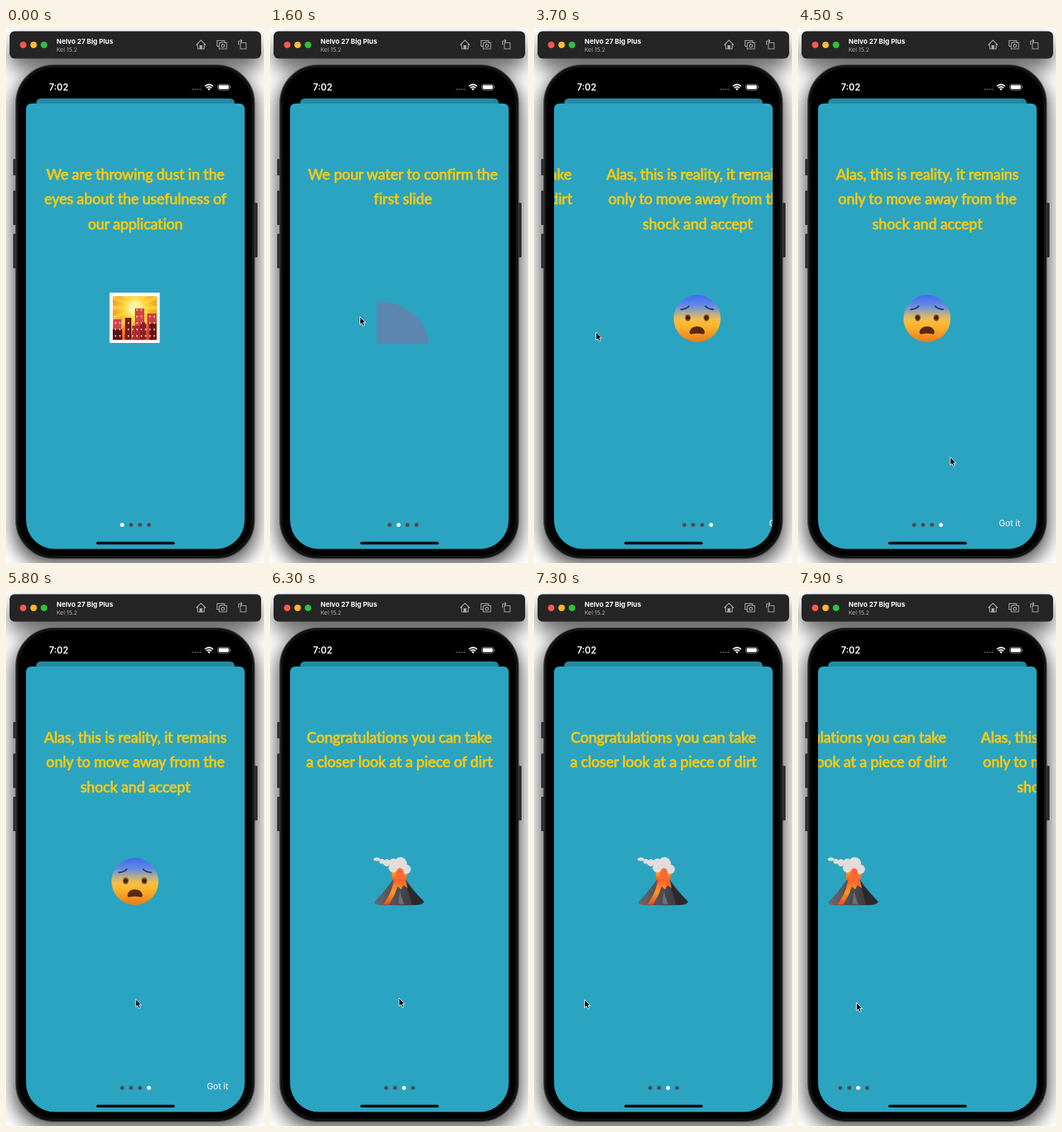
An HTML page that plays this animation: 360 px wide and 744 px high, repeating every 8 s.

```html
<!DOCTYPE html>
<html lang="en">
<head>
<meta charset="utf-8">
<title>Onboarding slides</title>
<style>
  html, body { margin: 0; width: 100%; height: 100%; overflow: hidden; background: #fff; }
  svg { display: block; width: 360px; height: 744px; }
  text { font-family: Inter, Roboto, sans-serif; fill: #fff; }
  .title {
    font: 500 20.6px Lato, "Open Sans", sans-serif; letter-spacing: -.15px; text-anchor: middle;
    fill: #f5c814; stroke: #f5c814; stroke-width: .75px; stroke-linejoin: round;
  }
</style>
</head>
<body>
<svg viewBox="0 0 360 744" xmlns="http://www.w3.org/2000/svg">
  <defs>
    <filter id="blur" x="-30%" y="-100%" width="160%" height="300%"><feGaussianBlur stdDeviation="13"/></filter>
    <clipPath id="sheetClip"><use href="#sheet"/></clipPath>
    <clipPath id="photoClip"><rect x="149" y="373" width="61.500" height="60.500"/></clipPath>
    <radialGradient id="sky" gradientUnits="userSpaceOnUse" cx="180" cy="389" r="46">
      <stop offset=".12" stop-color="#fff6b0"/><stop offset=".35" stop-color="#ffd22e"/>
      <stop offset=".7" stop-color="#fb9a1c"/><stop offset="1" stop-color="#ee4f1a"/>
    </radialGradient>
    <linearGradient id="skin" x2="0" y2="1">
      <stop offset="0" stop-color="#3f6cf0"/><stop offset=".22" stop-color="#628ae2"/>
      <stop offset=".4" stop-color="#b5ae90"/><stop offset=".52" stop-color="#f2bd4a"/>
      <stop offset=".66" stop-color="#ffb62c"/><stop offset="1" stop-color="#e87a18"/>
    </linearGradient>
    <linearGradient id="lava" x2="0" y2="1">
      <stop offset="0" stop-color="#ff5a2a"/><stop offset=".5" stop-color="#ff9a24"/><stop offset="1" stop-color="#ee4f18"/>
    </linearGradient>
    <linearGradient id="rock">
      <stop offset="0" stop-color="#6a6a70"/><stop offset=".5" stop-color="#4a4a50"/><stop offset="1" stop-color="#2e2e34"/>
    </linearGradient>
    <pattern id="windows" width="6" height="9" patternUnits="userSpaceOnUse" x="1" y="3">
      <rect x="1" y="1" width="1.600" height="2.400" fill="#ffe08a"/>
    </pattern>
  </defs>

  <!-- Backdrop shadows -->
  <rect width="360" height="744" fill="#fff"/>
  <g filter="url(#blur)">
    <rect x="10" y="62" width="340" height="685" rx="50" opacity=".7"/>
    <rect x="5" y="18" width="351" height="38" rx="7" opacity=".6"/>
  </g>

  <!-- Window bar -->
  <rect x="5" y="4.500" width="351" height="38" rx="7" fill="#262526"/>
  <circle cx="24" cy="23.500" r="4.600" fill="#fe5950"/>
  <circle cx="38.500" cy="23.500" r="4.600" fill="#fdba2c"/>
  <circle cx="53" cy="23.500" r="4.600" fill="#2ac43e"/>
  <text x="70.500" y="22" font-size="9.400" font-weight="700">Nelvo 27 Big Plus</text>
  <text x="70.500" y="32.500" font-size="8" style="fill:#aaa">Kel 15.2</text>
  <g fill="none" stroke="#a9a9a9" stroke-width="1.100" stroke-linejoin="round" stroke-linecap="round">
    <path d="M265.500 23.500L272 17L278.500 23.500M267.500 22.500V29H276.500V22.500"/>
    <rect x="270.500" y="24.500" width="3" height="4.500" fill="#a9a9a9"/>
    <path d="M297 25.500H294.500V17.500H305V19.500"/>
    <path d="M297.500 20.500H300L301 19.500H304.500L305.500 20.500H308V29H297.500Z"/>
    <circle cx="302.700" cy="24.700" r="2.100"/>
    <path d="M327 20.500H335V29H327ZM324.500 23V18H329M327.500 16.200L329.300 18L327.500 19.800"/>
  </g>

  <!-- Phone -->
  <g fill="#2c2c2e">
    <rect x="10" y="182" width="5" height="23" rx="1.500"/>
    <rect x="10" y="226" width="5" height="48" rx="1.500"/>
    <rect x="10" y="286" width="5" height="48" rx="1.500"/>
    <rect x="346" y="243" width="5" height="76" rx="1.500"/>
  </g>
  <rect x="14" y="51.500" width="332.500" height="686" rx="53" fill="#000" stroke="#39393b" stroke-width="1.600"/>
  <rect x="16.500" y="54" width="327.500" height="681" rx="51" fill="none" stroke="#161617" stroke-width="2"/>
  <text x="60" y="87" font-size="12.600" font-weight="600">7:02</text>
  <g fill="#4c4c4e">
    <circle cx="260.500" cy="85.300" r="1.200"/><circle cx="264" cy="85.300" r="1.200"/>
    <circle cx="267.500" cy="85.300" r="1.200"/><circle cx="271" cy="85.300" r="1.200"/>
  </g>
  <g fill="none" stroke="#fff" stroke-width="1.800">
    <path d="M277.700 81Q283.300 76 288.900 81M279.800 83.300Q283.300 80.200 286.800 83.300"/>
    <path d="M281.300 84.600Q283.300 82.900 285.300 84.600L283.300 86.900Z" fill="#fff" stroke="none"/>
    <rect x="295.500" y="78.300" width="16.500" height="8" rx="2.500" stroke="#888" stroke-width=".9"/>
    <rect x="296.800" y="79.600" width="13.900" height="5.400" rx="1.400" fill="#fff" stroke="none"/>
    <path d="M313.200 81V83.600" stroke="#888" stroke-width="1"/>
  </g>

  <!-- Sheets -->
  <path d="M42 120V105Q42 98 49 98H312Q319 98 319 105V120Z" fill="#2588a3"/>
  <path id="sheet" d="M28 113Q28 105 36 105H325Q333 105 333 113V684.500A40 40 0 0 1 293 724.500H68A40 40 0 0 1 28 684.500Z" fill="#2aa4c1"/>
  <g clip-path="url(#sheetClip)">
    <g id="slides">
      <g>
        <rect x="144.500" y="368" width="70" height="70" fill="#fff"/>
        <g clip-path="url(#photoClip)">
          <rect x="149" y="373" width="62" height="61" fill="url(#sky)"/>
          <path id="rays" fill="#ffe36a" opacity=".5"/>
          <circle cx="180" cy="389" r="9" fill="#fff3a0"/>
          <g id="city"></g>
        </g>
      </g>
      <path d="M144 439V380A72 59 0 0 1 216 439Z" fill="#5d87b0"/>
      <g>
        <path d="M171 405Q168 389 174 380H191Q193 392 189 405Z" fill="url(#lava)"/>
        <g fill="#e3dcdc">
          <circle cx="182" cy="379" r="9"/><circle cx="190" cy="387" r="6.500"/><circle cx="172" cy="385" r="6.500"/>
          <circle cx="172" cy="378" r="6"/><circle cx="163" cy="378" r="5"/>
          <circle cx="156" cy="376" r="3.500"/><ellipse cx="149" cy="373" rx="4.500" ry="2.500"/>
        </g>
        <path d="M177 388Q182 382 186 389L188 404H174Z" fill="#ff6a34"/>
        <path d="M145 433Q159 419 171 402Q180 406 190 402Q201 418 215 432Q214 437 200 437H156Q146 437 145 433Z" fill="url(#rock)"/>
        <path d="M189 404L198 436H206L214 432Q201 418 189 404Z" fill="#29292e"/>
        <path d="M173 401Q181 404 189 401L192 413L186 409L183 415L178 411L174 422L166 436H158Q166 425 170 414Z" fill="url(#lava)"/>
        <path d="M181 417L179 435L187 436Z" fill="#6e6e74"/>
      </g>
      <g>
        <circle cx="180" cy="404" r="32.800" fill="url(#skin)"/>
        <path d="M157.500 391.500Q164 391 168.500 387M202.500 391.500Q196 391 191.500 387" fill="none" stroke="#27386e" stroke-width="2.200" stroke-linecap="round"/>
        <g fill="#8a5518"><ellipse cx="167" cy="403" rx="4" ry="4.800"/><ellipse cx="193" cy="403" rx="4" ry="4.800"/></g>
        <g fill="#3c1c0c"><circle cx="167" cy="403" r="2.700"/><circle cx="193" cy="403" r="2.700"/></g>
        <path d="M169.500 423Q171 415 180 415Q189 415 190.500 423Q190.500 426.500 187 425.500Q180 424 173 425.500Q169.500 426.500 169.500 423Z" fill="#5a2a10"/>
        <text x="280.300" y="692.500" font-size="11.800">Got it</text>
      </g>
    </g>
  </g>
  <rect x="126" y="714.600" width="109.500" height="3.600" rx="1.800" fill="#07090a"/>

  <path id="cursor" d="M0 0V11.200L2.600 8.900L4.500 13L6.500 12.100L4.700 8.100H8Z" stroke="#fff" stroke-width=".9" stroke-linejoin="round"/>
</svg>

<script>
const LOOP = 8000, STEP = 100, PAGE = 305, SWIPE = 400;
const $ = id => document.getElementById(id);
const add = (parent, tag, attrs = {}, text = '') => {
  const el = document.createElementNS('http://www.w3.org/2000/svg', tag);
  for (const key in attrs) el.setAttribute(key, attrs[key]);
  el.textContent = text;
  return parent.appendChild(el);
};

const titles = [
  ['We are throwing dust in the', 'eyes about the usefulness of', 'our application'],
  ['We pour water to confirm the', 'first slide'],
  ['Congratulations you can take', 'a closer look at a piece of dirt'],
  ['Alas, this is reality, it remains', 'only to move away from the', 'shock and accept']
];

// Buildings: left, top, width, colour
const buildings = [
  [180, 390, 13, '#d2434c'], [197, 397, 13, '#c93d45'], [150, 405, 11, '#cf4650'],
  [166, 403, 9, '#751626'], [176, 414, 11, '#a92b36'], [187, 409, 9, '#8c1d2c'],
  [200, 411, 10, '#651322'], [149, 419, 13, '#5a1020']
];
for (const [x, y, width, colour] of buildings) {
  for (const fill of [colour, 'url(#windows)']) add($('city'), 'rect', { x, y, width, height: 434 - y, fill });
}

const spoke = angle => `${180 + 50 * Math.cos(angle)} ${389 + 50 * Math.sin(angle)}`;
$('rays').setAttribute('d', Array.from({ length: 14 }, (_, i) => {
  const angle = i * Math.PI / 7;
  return `M180 389L${spoke(angle - .09)}L${spoke(angle + .09)}Z`;
}).join(''));

[...$('slides').children].forEach((art, page) => {
  const group = add($('slides'), 'g', { transform: `translate(${page * PAGE})` });
  group.append(art);
  titles[page].forEach((line, i) =>
    add(group, 'text', { x: 180.5, y: 211 + i * 34.4, class: 'title' }, line));
  for (let i = 0; i < 4; i++) {
    add(group, 'circle', { cx: 162 + i * 12.5, cy: 691, r: 2.8, fill: i === page ? '#fff' : '#4b4d50' });
  }
});

// Swipes: start time, direction
const swipes = [[1230, 1], [2290, 1], [3400, 1], [5880, -1], [6320, -1], [6758, 1], [7744, 1]];
// Pointer stops: time, x, y
const stops = [
  [600, 332, 560], [900, 277, 403], [1200, 277, 403], [1600, 125.5, 401.5], [1700, 118, 402],
  [2000, 277, 406], [2100, 266, 407], [2250, 266, 407], [2700, 39.5, 403.5], [2800, 38, 404],
  [3300, 290, 418], [3700, 86.5, 423], [3900, 62, 425], [4900, 294, 690], [5300, 300, 696],
  [5800, 181, 567.5], [5950, 60, 566], [6250, 300, 566], [6350, 60, 566], [6700, 337, 562],
  [6900, 258, 563], [7150, 45, 568], [7700, 185, 570], [7900, 81.5, 572.5]
];

const ease = u => {
  u = Math.min(1, Math.max(0, u));
  return u * u * (3 - 2 * u);
};

function pointerAt(t) {
  const next = stops.findIndex(stop => stop[0] >= t);
  const b = stops[Math.max(next, 0)], a = stops[Math.max(next - 1, 0)];
  const u = ease((t - a[0]) / (b[0] - a[0] || 1));
  return [a[1] + (b[1] - a[1]) * u, a[2] + (b[2] - a[2]) * u];
}

function draw(t) {
  const scroll = PAGE * swipes.reduce((sum, [start, dir]) => sum + dir * ease((t - start) / SWIPE), 0);
  $('slides').setAttribute('transform', `translate(${-scroll})`);
  $('cursor').setAttribute('visibility', t < stops[0][0] ? 'hidden' : 'visible');
  $('cursor').setAttribute('transform', `translate(${pointerAt(t)})`);
}

// The picture advances ten times a second; the small lead absorbs timer jitter.
let origin;
function tick(now) {
  origin ??= now;
  draw(Math.floor((now - origin + 25) / STEP) * STEP % LOOP);
  requestAnimationFrame(tick);
}
draw(0);
requestAnimationFrame(tick);
</script>
</body>
</html>
```
